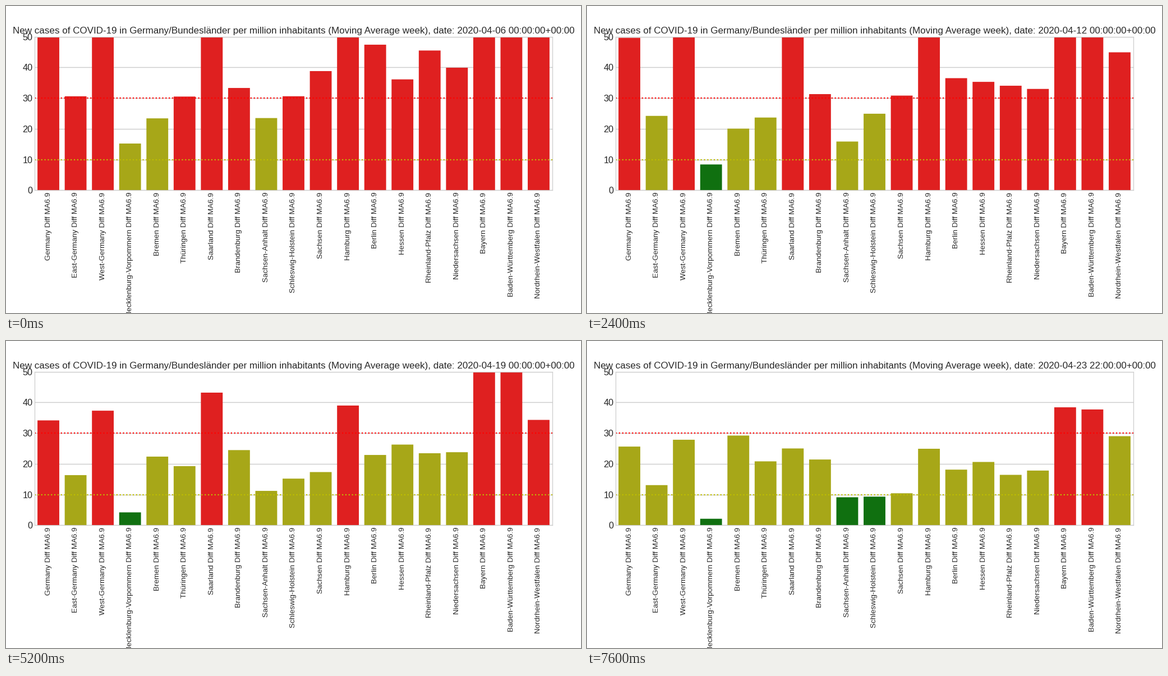
Animation of 1025x547 px, one loop 8000 ms. Source, as a matplotlib script:

```python
import matplotlib.pyplot as plt
import numpy as np
from matplotlib.animation import FuncAnimation

W, H, DPI = 1025, 547, 72  # at 72 dpi one point is one pixel
FRAMES, INTERVAL = 20, 400
RED, OLIVE, GREEN = "#df2020", "#a7a718", "#107010"
INK, GRID = "0.15", "0.8"

# State: millions of inhabitants, then new cases per million on the key days.
KEY_DAYS = [0, 4, 9, 19]
EAST = {
    "Mecklenburg-Vorpommern": (1.6, 15.2, 10.5, 6.1, 2.1),
    "Thüringen": (2.1, 30.5, 29.1, 17.8, 20.8),
    "Brandenburg": (2.5, 33.3, 35.0, 27.3, 21.4),
    "Sachsen-Anhalt": (2.2, 23.5, 18.4, 13.1, 9.1),
    "Sachsen": (4.1, 38.8, 37.4, 23.7, 10.4),
}
WEST = {
    "Bremen": (0.7, 23.4, 23.8, 16.0, 29.2),
    "Saarland": (1.0, 90, 80, 60, 25.0),
    "Schleswig-Holstein": (2.9, 30.6, 28.9, 20.6, 9.3),
    "Hamburg": (1.8, 75, 70, 52, 24.9),
    "Berlin": (3.6, 47.4, 45.0, 27.3, 18.1),
    "Hessen": (6.3, 36.1, 38.8, 31.5, 20.6),
    "Rheinland-Pfalz": (4.1, 45.5, 37.8, 29.95, 16.4),
    "Niedersachsen": (8.0, 39.9, 36.4, 29.3, 17.8),
    "Bayern": (13.1, 105, 100, 73, 38.4),
    "Baden-Württemberg": (11.1, 95, 88, 64, 37.7),
    "Nordrhein-Westfalen": (17.9, 58, 50.2, 39.2, 29.0),
}
STATES = EAST | WEST
ORDER = ["Germany", "East-Germany", "West-Germany",
         "Mecklenburg-Vorpommern", "Bremen", "Thüringen", "Saarland",
         "Brandenburg", "Sachsen-Anhalt", "Schleswig-Holstein", "Sachsen",
         "Hamburg", "Berlin", "Hessen", "Rheinland-Pfalz", "Niedersachsen",
         "Bayern", "Baden-Württemberg", "Nordrhein-Westfalen"]


def daily(cases):
    """Daily values, each leg between key days slightly eased out."""
    legs = np.interp(range(FRAMES), KEY_DAYS, range(len(KEY_DAYS)))
    start = np.floor(legs)
    return np.interp(start + (legs - start) ** 0.8, range(len(cases)), cases)


def region(states):
    """Average over states, weighted by inhabitants."""
    return np.average([series[name] for name in states], axis=0,
                      weights=[people for people, *_ in states.values()])


def level_color(value):
    return RED if value > 30 else OLIVE if value > 10 else GREEN


def stamp(i):
    # Whole days first, then late evening and midnight take turns.
    late = max(i - 16, 0)
    day = 6 + i - late + late // 2
    hour = 22 * (late % 2)
    return f"2020-04-{day:02d} {hour:02d}:00:00+00:00"


series = {name: daily(cases) for name, (_, *cases) in STATES.items()}
series |= {"Germany": region(STATES), "East-Germany": region(EAST),
           "West-Germany": region(WEST)}

plt.rcParams["font.family"] = "Liberation Sans"
fig = plt.figure(figsize=(W / DPI, H / DPI), dpi=DPI, facecolor="white")
ax = fig.add_axes([0.05, 0.4, 0.9, 0.5])
ax.set_axisbelow(True)
ax.grid(axis="y", color=GRID, lw=1.4)
for spine in ax.spines.values():
    spine.set(color=GRID, linewidth=1.2)

bars = ax.bar(ORDER, 0, width=0.8, lw=0, snap=False)
ax.axhline(30, color="red", ls=":", lw=2.2)
ax.axhline(10, color="y", ls=":", lw=2.2)
ax.set(xlim=(-0.5, len(ORDER) - 0.5), ylim=(0, 50))
ax.set_yticks(range(0, 51, 10))
ax.set_xticks(range(len(ORDER)), [f"{name} Diff MA6.9" for name in ORDER],
              rotation=90)
ax.tick_params(length=0, pad=3.5, labelcolor=INK)
ax.tick_params(axis="x", labelsize=13.4)
ax.tick_params(axis="y", labelsize=16.2)
title = ax.set_title("", fontsize=17.04, color=INK, pad=5.7)


def update(i):
    for bar, name in zip(bars, ORDER):
        value = series[name][i]
        bar.set_height(value)
        bar.set_facecolor(level_color(value))
    title.set_text("New cases of COVID-19 in Germany/Bundesländer per million "
                   f"inhabitants (Moving Average week), date: {stamp(i)}")
    return [*bars, title]


anim = FuncAnimation(fig, update, frames=FRAMES, interval=INTERVAL,
                     repeat=True, repeat_delay=0, blit=False)
plt.show()
```
